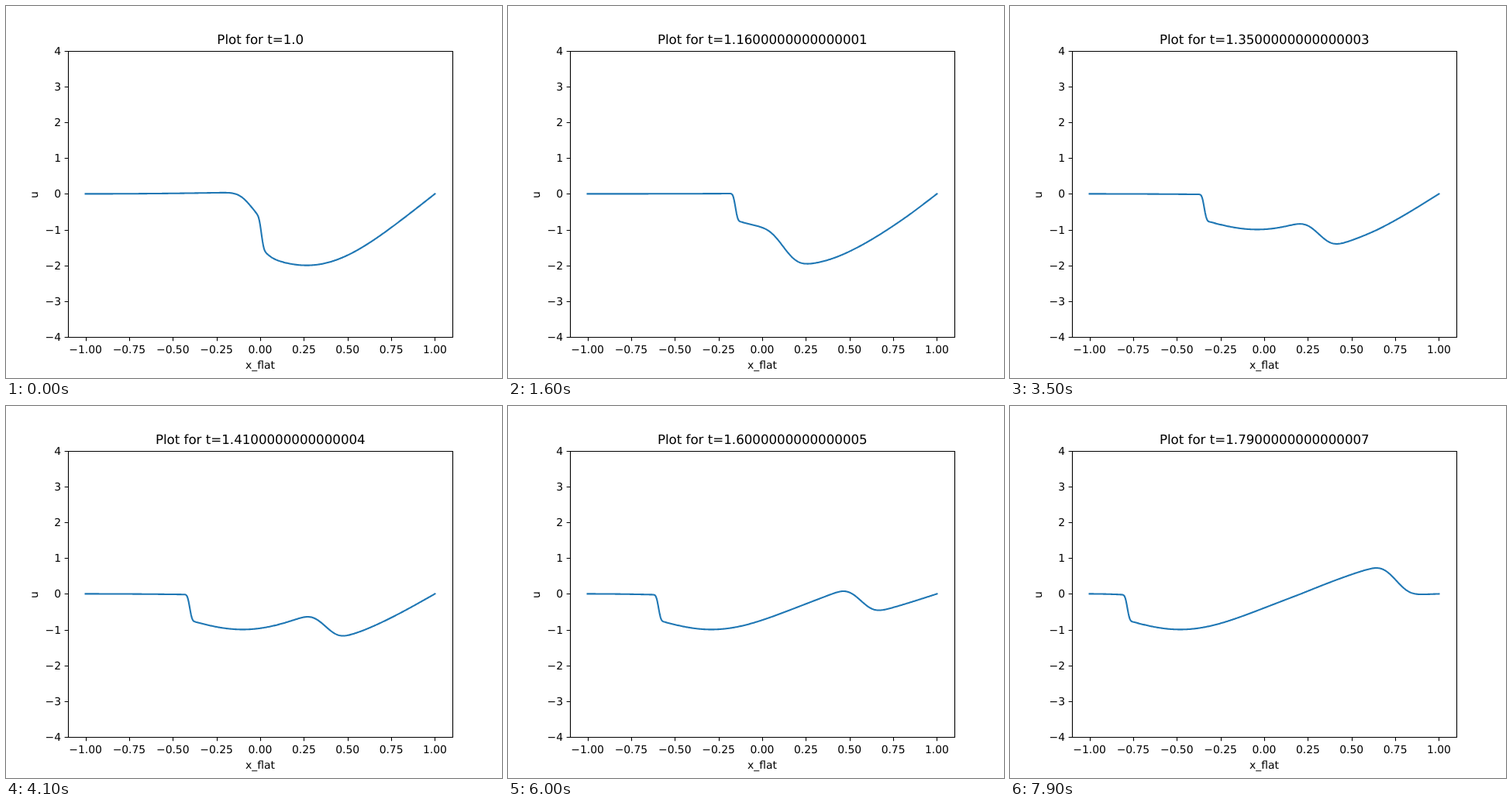
Write an HTML page that moves like this. It is 640 px wide and 480 px high and loops after 8000 ms.

```html
<!DOCTYPE html>
<html lang="en">
<head>
<meta charset="utf-8">
<title>Wave plot</title>
<style>
  html, body { margin: 0; width: 100%; height: 100%; overflow: hidden; background: #fff; }
  svg { display: block; width: 640px; height: 480px; }
  text { font: 13.889px "DejaVu Sans", sans-serif; text-anchor: middle; text-rendering: geometricPrecision; }
  #title { font-size: 16.667px; }
  #axes { fill: none; stroke: #000; stroke-width: 1.11; }
  #curve { fill: none; stroke: #1f77b4; stroke-width: 2.083; stroke-linejoin: round; stroke-linecap: square; }
  .y-label { text-anchor: end; }
</style>
</head>
<body>
<svg viewBox="0 0 640 480">
  <path id="curve"/>
  <path id="axes"/>
  <g id="labels"></g>
  <text id="title" x="328.3" y="49"></text>
  <text x="328" y="468">x_flat</text>
  <text transform="translate(41 243.5) rotate(-90)">u</text>
</svg>
<script>
const byId = id => document.getElementById(id);
const toX = x => 328 + 225.4545 * x;
const toY = u => 242.4 - 46.2 * u;
const FRAME_MS = 100, FRAMES = 80, SAMPLES = 450;

// Rises from 0 to 1 around a centre, a little steeper in the tails than a logistic curve.
function step(x, center, width) {
  const z = (x - center) / width;
  return 1 / (1 + Math.exp(-z - 0.03 * z ** 3));
}
const sharpFront = x => step(x, 0.0065, 0.0067);
const softFront = x => step(x, -0.043, 0.04);

const rightWave = x => -1.02 * softFront(x) * Math.cos(Math.PI / 2 * (x - 0.186) / 0.814);

// The left-going wave is the reflection of the other one beyond the wall at x = 1.
function leftWave(x) {
  if (x > 1) return -rightWave(2 - x);
  const swell = 0.51 * Math.sin(Math.PI * x) + 0.075 * Math.sin(2 * Math.PI * x);
  return -sharpFront(x) * (swell + 0.73 * (1 - x));
}

// Slight bend of the flat part ahead of the sharp front.
function bend(x, s) {
  const rise = 0.085 * Math.exp(-5 * s) - 0.03;
  return rise * ((x + 1) / (1 - s)) ** 2 * (1 - sharpFront(x + s));
}

function curvePath(s) {
  const points = Array.from({ length: SAMPLES + 1 }, (_, i) => {
    const x = 2 * i / SAMPLES - 1;
    const u = leftWave(x + s) + rightWave(x - s) + bend(x, s);
    return toX(x).toFixed(2) + " " + toY(u).toFixed(2);
  });
  return "M" + points.join("L");
}

function drawAxes() {
  const snap = v => Math.round(v) + 0.5;
  const signed = (v, digits) => (v < 0 ? "\u2212" : "") + Math.abs(v).toFixed(digits);
  let path = "M80.5 58.5H576.5V427.5H80.5Z", labels = "";
  for (let i = -4; i <= 4; i++) {
    const x = toX(i / 4), y = toY(i);
    path += `M${snap(x)} 427.5v4.86M80.5 ${snap(y)}h-4.86`;
    labels += `<text x="${x}" y="448">${signed(i / 4, 2)}</text>`
      + `<text class="y-label" x="71" y="${Math.round(y) + 5}">${signed(i, 0)}</text>`;
  }
  byId("axes").setAttribute("d", path);
  byId("labels").innerHTML = labels;
}

let shown = -1;
function render(now) {
  const frame = Math.floor(now / FRAME_MS) % FRAMES;
  if (frame === shown) return;
  shown = frame;
  const t = 1 + frame * (1.01 - 1);
  byId("title").textContent = "Plot for t=" + (Number.isInteger(t) ? t.toFixed(1) : t);
  byId("curve").setAttribute("d", curvePath(t - 1));
}

drawAxes();
const start = performance.now();
function tick() {
  render(performance.now() - start);
  requestAnimationFrame(tick);
}
tick();
</script>
</body>
</html>
```
